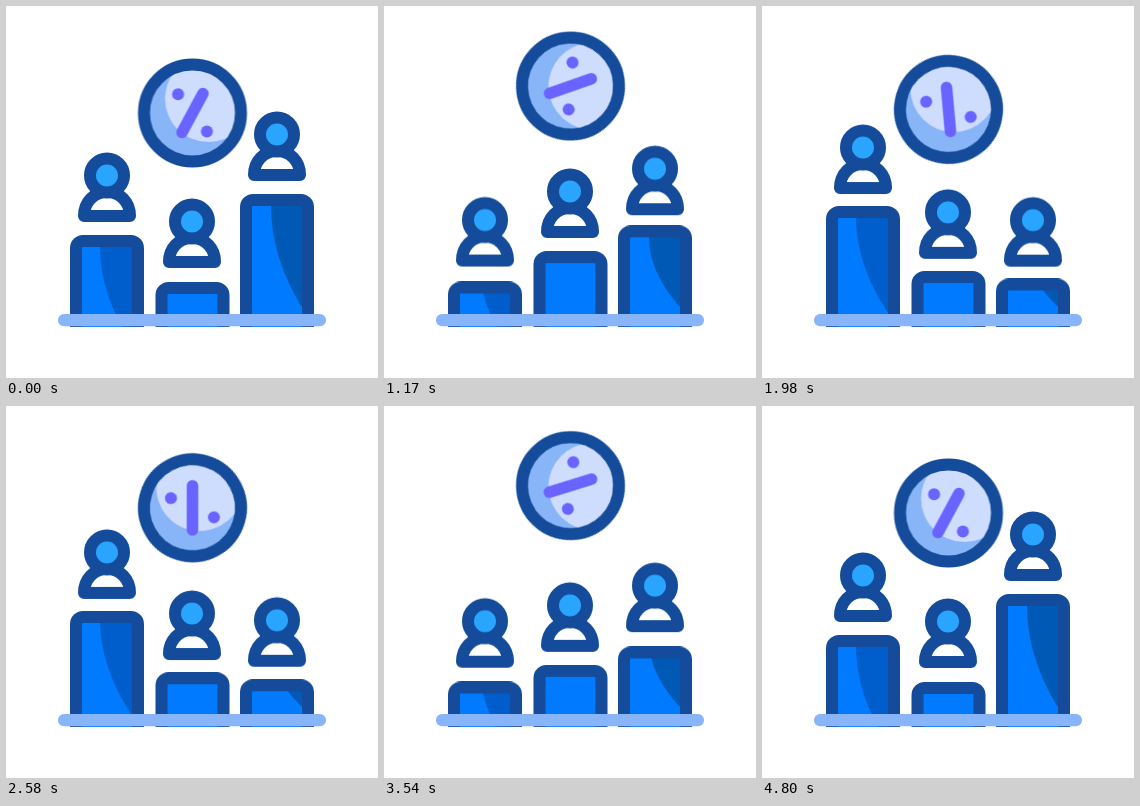
An HTML page without scripts that plays this animation: 372 px wide and 372 px high, repeating every 5100 ms.

```html
<!DOCTYPE html>
<html lang="en">
<head>
<meta charset="utf-8">
<title>Interest ranking</title>
<style>
  html, body { margin: 0; width: 100%; height: 100%; overflow: hidden; background: #fff; }
  svg { display: block; width: 100vw; height: 100vh; }

  .line { stroke: #144b9a; stroke-width: 12; stroke-linejoin: round; }
  .bar { fill: #007bff; }

  /* Every part passes through poses a, b, c, d and back to a */
  .coin, .head, .top, .squash {
    animation: 5100ms cubic-bezier(.333, 0, .667, 1) infinite;
  }
  .coin { animation-name: coin; }
  .head { animation-name: head; }
  .top { animation-name: top; }
  .squash { animation-name: squash; }

  @keyframes coin {
    0%, 94.118%, 100% { transform: translate(186.5px, 107px) rotate(0deg); }
    20.588%, 67.647% { transform: translate(186.5px, 79.3px) rotate(45deg); }
    44.118% { transform: translate(186.5px, 107px) rotate(-45deg); }
  }
  @keyframes head {
    0%, 91.176%, 100% { transform: translateY(var(--a)); }
    20.588% { transform: translateY(var(--b)); }
    44.118% { transform: translateY(var(--c)); }
    67.647% { transform: translateY(var(--d)); }
  }
  @keyframes top {
    0%, 88.235%, 100% { transform: translateY(var(--a)); }
    20.588% { transform: translateY(var(--b)); }
    44.118% { transform: translateY(var(--c)); }
    67.647% { transform: translateY(var(--d)); }
  }
  @keyframes squash {
    0%, 88.235%, 100% { transform: translateY(300px) scaleY(1); }
    20.588% { transform: translateY(300px) scaleY(.69); }
    44.118% { transform: translateY(300px) scaleY(.58); }
    67.647% { transform: translateY(300px) scaleY(.65); }
  }

  .left.top { --a: 229px; --b: 278px; --c: 188.5px; --d: 276.5px; }
  .mid.top { --a: 276px; --b: 244.4px; --c: 268px; --d: 258.5px; }
  .right.top { --a: 188px; --b: 217.5px; --c: 280.5px; --d: 241.5px; }
  .shade.top { --a: 241px; --b: 250px; --c: 205px; --d: 250px; }

  .left.head { --a: 216px; --b: 263px; --c: 177px; --d: 262.5px; }
  .mid.head { --a: 262px; --b: 231.3px; --c: 256px; --d: 245.6px; }
  .right.head { --a: 175px; --b: 207.5px; --c: 268.5px; --d: 227px; }
</style>
</head>
<body>
<svg viewBox="0 0 372 372">
  <defs>
    <rect id="bar" x="-31" y="6" width="62" height="200" rx="7"/>
    <g id="person" class="line">
      <path d="M-23-6C-23-20-13-30 0-30S23-20 23-6Z" fill="#fff"/>
      <circle cy="-46.5" r="17" fill="#29a5ff"/>
    </g>
    <clipPath id="floor"><rect width="372" height="320.6"/></clipPath>
    <clipPath id="leftBar"><rect class="left top" x="70" y="6" width="62" height="200"/></clipPath>
    <clipPath id="rightBar"><rect class="right top" x="240" y="6" width="62" height="200"/></clipPath>
    <clipPath id="face"><circle r="44"/></clipPath>
  </defs>

  <g class="coin">
    <circle r="44" fill="#88b4f8"/>
    <circle cx="16" cy="-14.4" r="43.5" fill="#cedcfd" clip-path="url(#face)"/>
    <circle class="line" r="48.5" fill="none"/>
    <path d="M10.5-19.5L-10.5 19.5" stroke="#6b63ff" stroke-width="11.5" stroke-linecap="round"/>
    <g fill="#6b63ff">
      <circle cx="-14.4" cy="-18.8" r="6"/>
      <circle cx="14.4" cy="18.4" r="6"/>
    </g>
  </g>

  <g clip-path="url(#floor)">
    <g class="left top"><use href="#bar" x="101" class="bar"/></g>
    <g clip-path="url(#leftBar)">
      <path class="shade top" d="M94-100V0Q94 48 126 96H132V-100Z" fill="#005dcc"/>
    </g>
    <g class="left top"><use href="#bar" x="101" class="line" fill="none"/></g>

    <g class="mid top"><use href="#bar" x="186.5" class="bar line"/></g>

    <g class="right top"><use href="#bar" x="271" class="bar"/></g>
    <g clip-path="url(#rightBar)">
      <path class="squash" d="M265-400V-100Q265-50 295 0H302V-400Z" fill="#0059b5"/>
    </g>
    <g class="right top"><use href="#bar" x="271" class="line" fill="none"/></g>
  </g>

  <g class="left head"><use href="#person" x="101"/></g>
  <g class="mid head"><use href="#person" x="186"/></g>
  <g class="right head"><use href="#person" x="271"/></g>

  <rect x="52" y="308" width="268" height="12.3" rx="6" fill="#88b4fa"/>
</svg>
</body>
</html>
```
